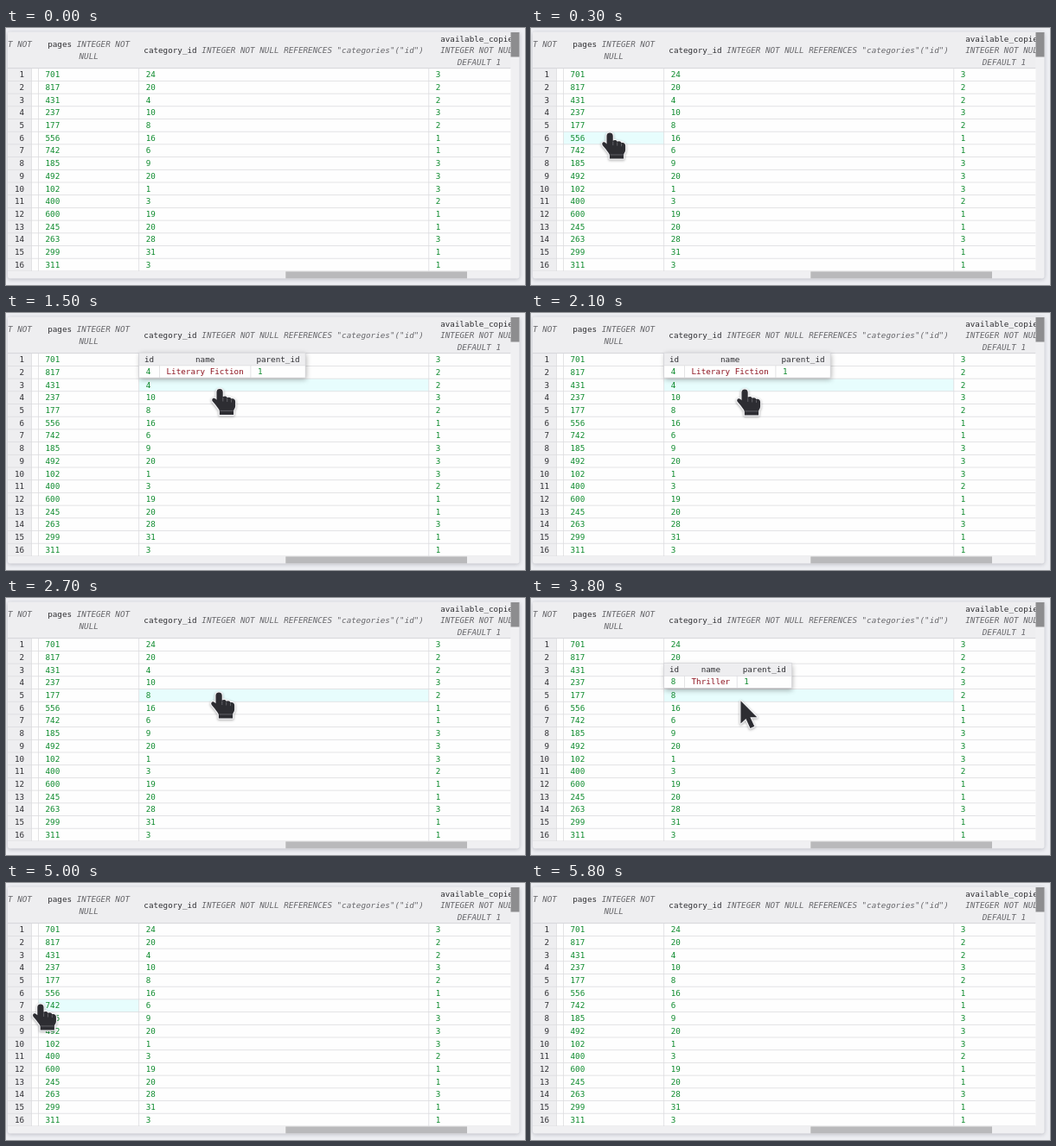
Write an HTML page with a canvas that moves like this. It is 600 by 298 pixels and loops after 5900 ms.

```html
<!DOCTYPE html>
<html lang="en">
<head>
<meta charset="utf-8">
<title>Table with linked row preview</title>
<style>
  html, body { margin: 0; width: 100%; height: 100%; overflow: hidden; background: #edeef2; }
  canvas { display: block; width: 600px; height: 298px; }
</style>
</head>
<body>
<canvas id="stage"></canvas>
<script>
const W = 600, H = 298, LOOP = 5900, STEP = 100;
const canvas = document.getElementById('stage');
const ctx = canvas.getContext('2d');
const ratio = window.devicePixelRatio || 1;
canvas.width = W * ratio;
canvas.height = H * ratio;
ctx.scale(ratio, ratio);

const SIZE = 9.28, CHAR = SIZE * 0.602;
const FONT = SIZE + 'px "DejaVu Sans Mono", monospace';
const TOP = 46.7, ROW = 14.7, RIGHT = 583.5, BOTTOM = 282;
const COLS = [29.5, 37.5, 153.7, 488.8, RIGHT];
const GREEN = '#0c8a2c', RED = '#8e1420', DARK = '#2f2f33', MUTED = '#66666a';
const HEAD = '#eeeef0', LINE = '#dcdcdf', HOVER = '#e7fdfd';

const pages = [701, 817, 431, 237, 177, 556, 742, 185, 492, 102, 400, 600, 245, 263, 299, 311];
const categories = [24, 20, 4, 10, 8, 16, 6, 9, 20, 1, 3, 19, 20, 28, 31, 3];
const copies = [3, 2, 2, 3, 2, 1, 1, 3, 3, 3, 2, 1, 1, 3, 1, 1];

const popups = [
  { from: 1100, to: 2200, row: 2, id: 4, name: 'Literary Fiction' },
  { from: 3100, to: 4500, row: 4, id: 8, name: 'Thriller' }
];

// Pointer path: time, x, y of the hot spot
const path = [
  [100, -14, 148], [560, 248, 82.5], [900, 248, 83], [1400, 247.5, 88],
  [2050, 247.5, 88], [2600, 246.5, 109.5], [3200, 246.5, 110],
  [3700, 242.5, 119.3], [4300, 242, 119.5], [4950, 40.5, 140.5],
  [5250, 38, 141], [5600, 8, 146]
];

const rowTop = i => TOP + i * ROW;

function rect(x, y, w, h, color) {
  ctx.fillStyle = color;
  ctx.fillRect(x, y, w, h);
}

function text(str, x, mid, color, italic) {
  ctx.font = (italic ? 'italic ' : '') + FONT;
  ctx.fillStyle = color;
  ctx.fillText(str, x, mid + 3.4);
}

function centered(str, cx, mid, color, italic) {
  text(str, cx - str.length * CHAR / 2, mid, color, italic);
}

// A column title followed by its declaration
function title(name, type, x, mid) {
  text(name, x, mid, DARK);
  text(type, x + (name.length + 1) * CHAR, mid, MUTED, true);
}

function panel() {
  rect(0, 0, W, H, '#edeef2');
  ctx.save();
  ctx.shadowColor = 'rgba(40,40,60,.25)';
  ctx.shadowBlur = 4 * ratio;
  ctx.shadowOffsetY = ratio;
  ctx.fillStyle = '#f0f0f2';
  ctx.beginPath();
  ctx.roundRect(2, 4.5, 591.5, 286, 3);
  ctx.fill();
  ctx.restore();
  rect(2, TOP, RIGHT - 2, BOTTOM - TOP, '#fefefe');
  rect(2, 5, RIGHT - 2, TOP - 5, HEAD);
  rect(2, TOP, COLS[0] - 2, BOTTOM - TOP, HEAD);
  rect(RIGHT, 5, 10, 28.5, '#8d8d8f');
  rect(323.3, 282.4, 209.7, 8, '#b9b9bb');
}

function header() {
  text('T NOT', 2, 18.8, MUTED, true);
  title('pages', 'INTEGER NOT', 48.2, 18.8);
  centered('NULL', 95.7, 32.2, MUTED, true);
  title('category_id', 'INTEGER NOT NULL REFERENCES "categories"("id")', 159.3, 26);
  text('available_copies', 502.2, 12.2, DARK);
  text('INTEGER NOT NULL', 502.2, 26, MUTED, true);
  centered('DEFAULT 1', 546.9, 39.6, MUTED, true);
}

function grid(hover) {
  if (hover) {
    const x = COLS[hover.col];
    rect(x, rowTop(hover.row), COLS[hover.col + 1] - x, ROW, HOVER);
  }
  for (let i = 0; i <= 16; i++) rect(2, rowTop(i) - 0.4, RIGHT - 2, 0.8, i ? LINE : '#cfcfd3');
  COLS.slice(0, 4).forEach(x => rect(x - 0.4, TOP, 0.8, BOTTOM - TOP, LINE));
  for (let i = 0; i < 16; i++) {
    const mid = rowTop(i) + 7.1, label = String(i + 1);
    text(label, 21.2 - label.length * CHAR, mid, DARK);
    [pages, categories, copies].forEach((data, c) => text(String(data[i]), COLS[c + 1] + 8, mid, GREEN));
  }
}

function popup({ row, id, name }) {
  const x = COLS[2], y = rowTop(row) - 29.9, h = 2 * ROW - 0.5;
  const widths = [23.8, name.length * CHAR + 16, 9 * CHAR + 13];
  const total = widths.reduce((a, b) => a + b);
  ctx.save();
  ctx.shadowColor = 'rgba(0,0,0,.32)';
  ctx.shadowBlur = 6 * ratio;
  ctx.shadowOffsetX = ratio;
  ctx.shadowOffsetY = 2 * ratio;
  rect(x, y, total, h, '#fefefe');
  ctx.restore();
  rect(x, y, total, ROW, HEAD);
  rect(x, y + ROW - 0.4, total, 0.8, LINE);
  const titles = ['id', 'name', 'parent_id'], values = [String(id), name, '1'];
  let left = x;
  widths.forEach((w, i) => {
    centered(titles[i], left + w / 2, y + 6.9, DARK);
    text(values[i], left + 8, y + 21, i === 1 ? RED : GREEN);
    if (i) rect(left - 0.4, y + ROW, 0.8, h - ROW, LINE);
    left += w;
  });
  ctx.strokeStyle = '#d2d2d6';
  ctx.lineWidth = 0.7;
  ctx.strokeRect(x, y, total, h);
}

const arrow = new Path2D('M0 0V26.2L6 20.6L11 31.6L15.8 29.4L10.9 18.9H18.8Z');
const hand = new Path2D(
  'M-4 3.4C-4 -1.2 3.2 -1.2 3.2 3.4V9.2C4.8 7.8 7.7 8.4 8.2 10.2C10 9 12.6 9.8 13 11.6' +
  'C15.2 10.8 17.6 12 17.6 14.8V20C17.6 22.5 15.6 23.5 15.6 25.5V30H-0.6V26' +
  'C-0.6 23.8 -3.5 21.5 -5.2 18.6L-8.6 14.6C-10.6 11.8 -7.4 9.4 -5.2 11.6L-4 12.8Z');
const folds = new Path2D('M3.3 10V14.5M8.2 11V15M13 12.4V15.6M0 25.4H15.2');

function pointer({ x, y }, isHand) {
  const shape = isHand ? hand : arrow;
  ctx.save();
  ctx.translate(x, y);
  ctx.lineJoin = 'round';
  ctx.save();
  ctx.shadowColor = 'rgba(0,0,0,.35)';
  ctx.shadowBlur = 3 * ratio;
  ctx.shadowOffsetY = ratio;
  ctx.strokeStyle = '#f4f4f6';
  ctx.lineWidth = 2.4;
  ctx.stroke(shape);
  ctx.restore();
  ctx.fillStyle = '#2d2d32';
  ctx.fill(shape);
  if (isHand) {
    ctx.strokeStyle = 'rgba(235,235,240,.45)';
    ctx.lineWidth = 0.6;
    ctx.stroke(folds);
  }
  ctx.restore();
}

function pointerAt(t) {
  const next = path.findIndex(p => p[0] > t);
  if (next < 1) return null;
  const [t0, x0, y0] = path[next - 1], [t1, x1, y1] = path[next];
  const u = (t - t0) / (t1 - t0), k = u * u * (3 - 2 * u);
  return { x: x0 + (x1 - x0) * k, y: y0 + (y1 - y0) * k };
}

function cellAt({ x, y }) {
  const col = COLS.findIndex((c, i) => x >= c && x < COLS[i + 1]);
  const row = Math.floor((y - TOP) / ROW);
  return col >= 0 && row >= 0 && row < 16 ? { col, row } : null;
}

// The pointer turns back into an arrow on the border between rows
function onBorder(y) {
  const d = (y - TOP) / ROW;
  return Math.abs(d - Math.round(d)) * ROW < 1.3;
}

function draw(t) {
  const pos = pointerAt(t);
  const hover = pos && cellAt(pos);
  panel();
  ctx.save();
  ctx.beginPath();
  ctx.rect(2, 5, RIGHT - 2, BOTTOM - 5);
  ctx.clip();
  header();
  grid(hover);
  const open = popups.find(p => t >= p.from && t < p.to);
  if (open) popup(open);
  ctx.restore();
  if (pos) pointer(pos, hover && !onBorder(pos.y));
}

const start = performance.now();
function tick() {
  const t = (performance.now() - start) % LOOP;
  draw(Math.floor(t / STEP) * STEP);
  requestAnimationFrame(tick);
}
tick();
</script>
</body>
</html>
```
